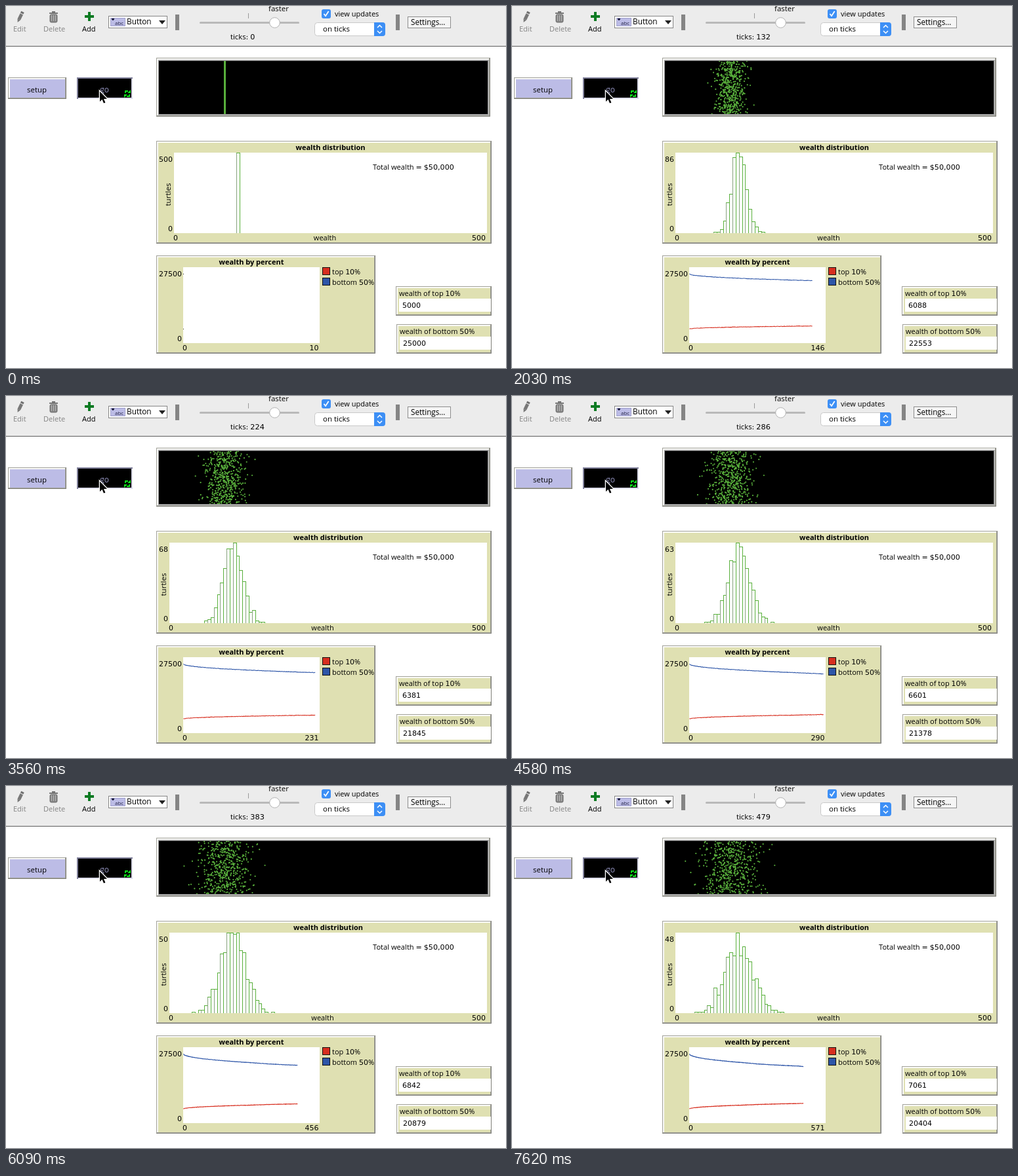
These frames come from a looping animation (762 px wide and 553 px high, 8000 ms). An HTML page with a canvas:

```html
<!DOCTYPE html>
<html lang="en">
<head>
<meta charset="utf-8">
<title>Wealth model</title>
<style>
html, body { margin: 0; width: 100%; height: 100%; overflow: hidden; background: #fff; }
canvas { display: block; }
</style>
</head>
<body>
<canvas id="stage" width="762" height="553"></canvas>
<script>
const ctx = document.getElementById('stage').getContext('2d');
const LOOP = 8000, STEP = 508, TURTLES = 500;
const GREEN = '#59b03c', KHAKI = '#dfe0b2', LILAC = '#bcbce6', RED = '#d72f20', BLUE = '#2d55a8';

// Key points; the values between them follow the root of the tick.
const keys = [
  { time: 0, tick: 0, peak: Infinity, top: 5000, low: 25000 },
  { time: 2030, tick: 132, peak: 86, top: 6088, low: 22553 },
  { time: 3560, tick: 224, peak: 68, top: 6381, low: 21845 },
  { time: 4580, tick: 286, peak: 63, top: 6601, low: 21378 },
  { time: 5590, tick: 349, peak: 51, top: 6774, low: 21017 },
  { time: 7110, tick: 452, peak: 46, top: 6971, low: 20618 },
  { time: 7620, tick: 479, peak: 48, top: 7061, low: 20404 }
];

function between(x, xOf, yOf) {
  const i = Math.max(1, keys.findIndex(k => xOf(k) >= x));
  const a = keys[i - 1], b = keys[i];
  const f = (x - xOf(a)) / (xOf(b) - xOf(a));
  return yOf(a) * (1 - f) + yOf(b) * f;
}
const byTick = (tick, yOf) => between(Math.sqrt(tick), k => Math.sqrt(k.tick), yOf);
const tickAt = time => Math.round(between(Math.min(time, 7620), k => k.time, k => k.tick));
const topWealth = tick => byTick(tick, k => k.top);
const lowWealth = tick => byTick(tick, k => k.low);
const peakAt = tick => Math.min(TURTLES, Math.ceil(1 / byTick(tick, k => 1 / k.peak) - 0.1));

// The axis grows by a quarter whenever the curve reaches its end.
function axisMax(tick) {
  if (!tick) return 10;
  const k = Math.ceil(Math.log((tick + 5) / 151) / Math.log(1.25));
  return Math.round(151 * 1.25 ** k - 5);
}

function seeded(s) {
  return () => {
    s = (s + 0x6D2B79F5) | 0;
    let t = Math.imul(s ^ (s >>> 15), 1 | s);
    t = (t + Math.imul(t ^ (t >>> 7), 61 | t)) ^ t;
    return ((t ^ (t >>> 14)) >>> 0) / 4294967296;
  };
}

const rand = seeded(41);
const people = Array.from({ length: TURTLES }, () => ({ y: 84 + rand() * 81, walk: 0 }));
const jitter = Array.from({ length: 480 }, () => rand() - 0.5);

// Close fit to the inverse of the normal distribution.
const bell = p => (p ** 0.135 - (1 - p) ** 0.135) / 0.1975;

let lastTick = 0;
const states = Array.from({ length: Math.ceil(LOOP / STEP) }, (_, n) => {
  const tick = tickAt(n * STEP), spread = Math.sqrt(tick), step = Math.sqrt(tick - lastTick);
  lastTick = tick;
  for (const p of people) p.walk += step * (rand() + rand() + rand() + rand() - 2) * 1.73;
  const order = people.map((p, i) => i).sort((a, b) => people[a].walk - people[b].walk);
  const wealth = [], bins = new Array(100).fill(0);
  order.forEach((id, rank) => {
    const w = 100 + spread * (bell((rank + 0.5) / TURTLES) + (rand() - 0.5) * 0.25);
    wealth[id] = w;
    bins[Math.floor(w / 5)]++;
  });
  return { tick, wealth, bins, peak: peakAt(tick) };
});

function rect(x, y, w, h, color) {
  ctx.fillStyle = color;
  ctx.fillRect(x, y, w, h);
}

function frame(x, y, w, h, color) {
  ctx.strokeStyle = color;
  ctx.lineWidth = 1;
  ctx.strokeRect(x + 0.5, y + 0.5, w - 1, h - 1);
}

function round(x, y, w, h, r, fill, line) {
  ctx.beginPath();
  ctx.roundRect(x, y, w, h, r);
  ctx.fillStyle = fill;
  ctx.fill();
  if (line) { ctx.strokeStyle = line; ctx.lineWidth = 1; ctx.stroke(); }
}

function path(points, color, width, closed) {
  ctx.beginPath();
  points.forEach(([x, y]) => ctx.lineTo(x, y));
  if (closed) ctx.closePath();
  ctx.strokeStyle = color;
  ctx.lineWidth = width;
  ctx.stroke();
}

function shape(points, color) {
  ctx.beginPath();
  points.forEach(([x, y]) => ctx.lineTo(x, y));
  ctx.fillStyle = color;
  ctx.fill();
}

function clipTo(x, y, w, h, paint) {
  ctx.save();
  ctx.beginPath();
  ctx.rect(x, y, w, h);
  ctx.clip();
  paint();
  ctx.restore();
}

// Figures use a wider face than words.
function text(str, x, y, { size = 11, color = '#000', bold = false, align = 0 } = {}) {
  const runs = str.split(/([\d$=,:]+)/).filter(Boolean).map(s => {
    const face = /^[\d$=,:]/.test(s) ? '"DejaVu Sans"' : '"Open Sans"';
    const font = `${bold ? 'bold ' : ''}${size}px ${face}, sans-serif`;
    ctx.font = font;
    return { s, font, w: ctx.measureText(s).width };
  });
  x -= align * runs.reduce((sum, r) => sum + r.w, 0);
  ctx.fillStyle = color;
  for (const r of runs) {
    ctx.font = r.font;
    ctx.fillText(r.s, x, y);
    x += r.w;
  }
}
const MID = 0.5, RIGHT = 1;

function panel(x, y, w, h, fill) {
  rect(x, y, w, h, '#7f7f78');
  rect(x, y, w - 1, h - 1, '#a2a29a');
  rect(x + 1, y + 1, w - 3, h - 3, '#fafaf8');
  rect(x + 3, y + 3, w - 5, h - 5, fill);
}

function toolbar(tick) {
  rect(0, 0, 762, 61, '#ececec');
  rect(0, 61, 762, 1, '#5c5c5c');

  // pencil
  ctx.save();
  ctx.translate(22, 16);
  ctx.rotate(0.45);
  rect(-2.5, -8, 5, 3, '#6e6e6e');
  rect(-2.5, -4, 5, 9, '#777');
  shape([[-2.5, 5], [2.5, 5], [0, 10]], '#777');
  ctx.restore();
  text('Edit', 11, 39, { color: '#858585' });

  // bin
  rect(70, 8, 5, 2, '#777');
  rect(66, 10, 13, 2, '#777');
  round(67, 13, 11, 12, 2, '#858585', '#6f6f6f');
  for (let x = 69; x < 77; x += 3) rect(x, 14, 1, 9, '#b8b8b8');
  text('Delete', 57, 39, { color: '#858585' });

  rect(120, 14, 14, 4, '#0b7a22');
  rect(125, 9, 4, 14, '#0b7a22');
  text('Add', 116, 39);

  rect(156, 15, 90, 19, '#fff');
  frame(156, 15, 90, 19, '#858585');
  rect(159, 18, 23, 13, LILAC);
  frame(159, 18, 23, 13, '#a3a3cd');
  text('abc', 166, 29, { size: 8, color: '#222245' });
  rect(161, 19, 4, 2, '#222245');
  rect(162, 21, 2, 1, '#222245');
  text('Button', 184, 28, { size: 11.8 });
  shape([[233, 22], [243, 22], [238, 28]], '#222');

  rect(258, 13, 6, 24, '#858585');
  rect(594, 13, 6, 24, '#858585');

  rect(369, 11, 1, 8, '#999');
  round(295, 24, 152, 3, 1.5, '#b9b9b9');
  round(401.7, 17.7, 15.6, 15.6, 7.8, '#fff', '#b2b2b2');
  text('faster', 400, 8, { size: 11.5 });
  text('ticks: ' + tick, 342, 51, { size: 11.3 });

  round(481, 5, 14, 14, 3, '#3d8ff5');
  path([[484.5, 12], [487, 15.3], [491.7, 8]], '#fff', 1.8);
  text('view updates', 501, 16);

  round(470.5, 25.5, 107, 20, 4, '#fff', '#c9c9c9');
  round(561, 25, 17, 21, [0, 4, 4, 0], '#3d8ff5');
  path([[566, 33], [569.5, 29.5], [573, 33]], '#fff', 1.5);
  path([[566, 38], [569.5, 41.5], [573, 38]], '#fff', 1.5);
  text('on ticks', 483, 39, { size: 11.5 });

  rect(612, 16, 66, 18, '#f5f5f5');
  frame(612, 16, 66, 18, '#8d8d8d');
  text('Settings…', 617, 29, { size: 11.7 });
}

function buttons() {
  panel(3, 109, 89, 33, LILAC);
  text('setup', 47, 132, { size: 11.4, align: MID });

  rect(108, 109, 85, 33, '#80809a');
  rect(110, 111, 83, 31, '#dcdcec');
  rect(110, 111, 81, 29, '#000');
  text('go', 150, 132, { size: 11.9, color: '#9797c4', align: MID });

  // repeat arrows
  const lime = '#0be51b';
  path([[182, 133], [182, 130], [186, 130]], lime, 1.8);
  path([[188, 135], [188, 138], [184, 138]], lime, 1.8);
  shape([[190, 128], [190, 133], [185, 133]], lime);
  shape([[180, 140], [180, 135], [185, 135]], lime);

  // pointer
  const tip = [[143, 130.5], [143, 146], [146.5, 142.8], [149, 148.5], [151.4, 147.5], [149, 142], [154, 141.8]];
  path(tip, '#fff', 2.6, true);
  shape(tip, '#000');
}

function world(s) {
  panel(229, 79, 509, 90, '#b9b9b9');
  rect(232, 83, 503, 83, '#8f8f8f');
  rect(233, 84, 501, 81, '#000');
  clipTo(233, 84, 501, 81, () => {
    if (!s.tick) return rect(332, 84, 3, 81, GREEN);
    ctx.fillStyle = GREEN;
    ctx.beginPath();
    people.forEach((p, i) => {
      const x = 233.5 + s.wealth[i];
      ctx.moveTo(x + 1.1, p.y);
      ctx.arc(x, p.y, 1.1, 0, 7);
    });
    ctx.fill();
  });
}

function histogram(s) {
  const left = s.peak > 99 ? 256 : 249, width = 733 - left, mid = (left + 733) / 2;
  panel(229, 206, 511, 157, KHAKI);
  rect(left, 224, width, 123, '#fff');
  text('wealth distribution', mid, 220, { bold: true, align: MID });
  text(String(s.peak), left - 2, 238, { align: RIGHT });
  text('0', left - 2, 344, { align: RIGHT });
  text('0', left - 1, 358);
  text('wealth', mid - 8.5, 358, { align: MID });
  text('500', 731, 358, { align: RIGHT });
  text('Total wealth = $50,000', 559, 250, { size: 11.15 });

  ctx.save();
  ctx.translate(left - 5, 288);
  ctx.rotate(-Math.PI / 2);
  text('turtles', 0, 0, { size: 11.6, align: MID });
  ctx.restore();

  const xAt = b => Math.round(left + b * width / 100);
  const tallest = Math.max(...s.bins);
  s.bins.forEach((n, b) => {
    if (!n) return;
    const x = xAt(b), end = xAt(b + 1), h = Math.max(2, Math.round(n / tallest * 123)), y = 347 - h;
    rect(x, y, 1, h, b % 2 ? GREEN : '#86a27d');
    rect(end, y, 1, h, GREEN);
    rect(x, y, end - x + 1, 1, GREEN);
  });
}

const moneyY = v => 514.3 - v / 27500 * 115.5;

function curve(tick, max, value, color, seed) {
  const points = [];
  for (let t = 0; t <= tick; t++) {
    const wobble = t ? jitter[(t * 7 + seed) % 480] * 0.6 : 0;
    points.push([270.5 + t / max * 207, moneyY(value(t)) + wobble]);
  }
  path(points, color, 1.1);
}

function percentPlot(s) {
  const max = axisMax(s.tick);
  panel(229, 381, 334, 150, KHAKI);
  rect(270, 399, 208, 116, '#fff');
  text('wealth by percent', 374, 395, { bold: true, align: MID });
  text('27500', 268, 413, { align: RIGHT });
  text('0', 268, 512, { align: RIGHT });
  text('0', 269, 526);
  text(String(max), 476.5, 526, { align: RIGHT });
  if (s.tick) {
    curve(s.tick, max, lowWealth, BLUE, 0);
    curve(s.tick, max, topWealth, RED, 31);
  } else {
    rect(270, 409, 1, 1, '#333');
    rect(270, 493, 1, 1, '#333');
  }
  clipTo(478, 384, 83, 140, () => {
    [['top 10%', RED], ['bottom 50%', BLUE]].forEach(([name, color], i) => {
      const y = 399 + i * 16;
      rect(482, y, 12, 12, color);
      frame(482, y, 12, 12, '#111');
      text(name, 497, y + 11);
    });
  });
}

function monitor(x, y, name, value) {
  panel(x, y, 740 - x, 45, KHAKI);
  text(name, x + 5, y + 15);
  rect(x + 5, y + 19, 729 - x + 5, 20, '#fff');
  text(String(Math.round(value)), x + 10, y + 33);
}

function draw(s) {
  rect(0, 0, 762, 553, '#fff');
  toolbar(s.tick);
  buttons();
  world(s);
  histogram(s);
  percentPlot(s);
  monitor(594, 428, 'wealth of top 10%', topWealth(s.tick));
  monitor(595, 486, 'wealth of bottom 50%', lowWealth(s.tick));
}

const start = performance.now();
let shown = -1;
function run() {
  const t = Math.max(0, performance.now() - start) % LOOP;
  const i = Math.min(states.length - 1, Math.floor((t + 8) / STEP));
  if (i !== shown) draw(states[shown = i]);
  requestAnimationFrame(run);
}
run();
</script>
</body>
</html>
```
